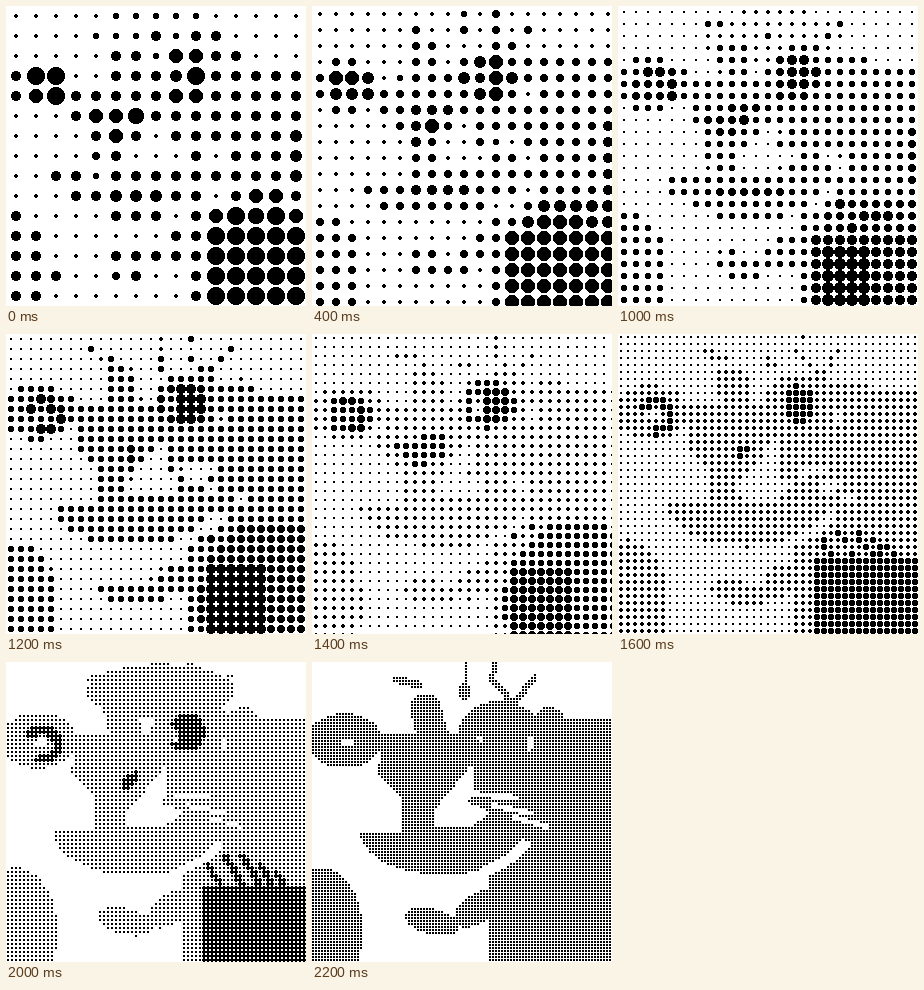
Animation, 300 px wide and 300 px high, one loop 2.4 s. Source, as an HTML page with a canvas:

```html
<!DOCTYPE html>
<html lang="en">
<head>
<meta charset="utf-8">
<title>Halftone cat</title>
<style>
html, body { margin: 0; width: 100%; height: 100%; overflow: hidden; background: #fff; }
canvas { display: block; width: 100vw; height: 100vh; image-rendering: pixelated; }
</style>
</head>
<body>
<canvas id="stage" width="300" height="300"></canvas>
<script>
const SIZE = 300, STEPS = 12, STEP_MS = 200;
const PAPER = 0.2, FUR = 0.54, COAT = 0.86;
const ctx = document.getElementById('stage').getContext('2d');

// Tone map: darkness is painted as grey and sampled once per halftone cell.
const toneCanvas = document.createElement('canvas');
toneCanvas.width = toneCanvas.height = SIZE;
const tc = toneCanvas.getContext('2d', { willReadFrequently: true });

function grey(d) {
  const v = Math.round(255 * (1 - d));
  return `rgb(${v},${v},${v})`;
}

function box(d, x, y, w, h) {
  tc.fillStyle = grey(d);
  tc.fillRect(x, y, w, h);
}

function oval(d, x, y, rx, ry = rx, turn = 0, end = 2 * Math.PI) {
  tc.beginPath();
  tc.ellipse(x, y, rx, ry, turn, 0, end);
  tc.fillStyle = grey(d);
  tc.fill();
}

function trace(pts) {
  tc.beginPath();
  for (let i = 0; i < pts.length; i += 2) tc.lineTo(pts[i], pts[i + 1]);
}

function patch(d, ...pts) {
  trace(pts);
  tc.fillStyle = grey(d);
  tc.fill();
}

function stroke(d, width, ...pts) {
  trace(pts);
  tc.strokeStyle = grey(d);
  tc.lineWidth = width;
  tc.stroke();
}

function paintHead() {
  box(FUR, 178, 56, 122, 244);
  oval(FUR, 188, 72, 42, 33);
  oval(FUR, 238, 60, 15);
  patch(FUR, 70, 73, 66, 112, 90, 136, 91, 176, 185, 176, 185, 70);
  oval(FUR, 128, 172, 80, 42, 0.03, Math.PI);
  oval(FUR, 165, 247, 26, 15, -0.6);
  oval(FUR, 120, 260, 28, 13, 0.25);
  oval(FUR, 10, 270, 42, 64);

  // forehead stripes
  stroke(FUR, 32, 114, 47, 122, 76);
  stroke(FUR, 9, 86, 18, 108, 24);
  stroke(FUR, 3, 154, 0, 154, 24);
  oval(FUR, 153, 30, 6, 9);
  stroke(FUR, 7, 200, 40, 180, 18, 184, 2);
  stroke(FUR, 7, 204, 40, 223, 16);
}

function paintEyes() {
  oval(FUR, 33, 79, 38, 28);
  oval(0.7, 38, 80, 24, 20);
  tc.beginPath();
  tc.arc(37, 83, 15, -2.4, 1.7);
  tc.strokeStyle = grey(0.9);
  tc.lineWidth = 9;
  tc.stroke();
  oval(PAPER, 36, 81, 7, 4, -0.2);

  oval(0.75, 178, 71, 26, 24);
  oval(0.9, 181, 71, 18, 19);
  oval(0.6, 167, 70, 4, 7);
  oval(PAPER, 169, 77, 3);
  stroke(PAPER, 5, 219, 77, 218, 87);
}

function paintMuzzle() {
  patch(0.66, 78, 107, 142, 99, 108, 142);
  oval(0.87, 125, 119, 11, 6, -0.7);
  oval(0.6, 130, 185, 34, 7);
  patch(PAPER, 160, 104, 163, 128, 155, 141, 178, 150, 160, 165, 122, 164, 122, 150);
  for (let k = 0; k < 3; k++) {
    const x = 160 + 22 * k, y = 132 + 12 * k, len = 46 - 7 * k;
    stroke(PAPER, 4, x, y, x + len, y + len * (0.1 + 0.1 * k));
  }
  stroke(PAPER, 9, 172, 211, 196, 199, 213, 183);
}

function paintCoat() {
  oval(0.6, 300, 150, 14, 38);
  oval(0.73, 265, 270, 73, 83);
  box(COAT, 198, 226, 102, 74);
  for (let i = 0; i < 5; i++) {
    const x = 203 + 17 * i, y = 204 - 10 * Math.sin(i);
    stroke(COAT, 6, x, y, x + 20, y + 32);
  }
  box(0.93, 202, 235, 56, 65);
}

tc.lineCap = tc.lineJoin = 'round';
box(PAPER, 0, 0, SIZE, SIZE);
oval(0.27, 155, 30, 75, 28);
paintHead();
paintEyes();
paintMuzzle();
paintCoat();
const tone = tc.getImageData(0, 0, SIZE, SIZE).data;

function darkness(x, y) {
  const px = Math.min(x, SIZE - 1), py = Math.min(y, SIZE - 1);
  return 1 - tone[(py * SIZE + px) * 4] / 255;
}

// Hard-edged disc of even width, built from pixel rows.
function dot(x, y, r) {
  for (let dy = -r; dy < r; dy++) {
    const w = Math.round(Math.sqrt(r * r - (dy + 0.5) ** 2));
    ctx.fillRect(x - w, y + dy, 2 * w, 1);
  }
}

function draw(step) {
  const pitch = Math.floor(20 - 17 * step / (STEPS - 1));
  const half = Math.floor(pitch / 2);
  ctx.fillStyle = '#fff';
  ctx.fillRect(0, 0, SIZE, SIZE);
  ctx.fillStyle = '#000';
  for (let y = half; y < SIZE + half; y += pitch)
    for (let x = half; x < SIZE + half; x += pitch)
      dot(x, y, Math.round(darkness(x, y) * half));
}

let shown = -1;
function tick(now) {
  const step = Math.floor(now / STEP_MS) % STEPS;
  if (step !== shown) draw(shown = step);
  requestAnimationFrame(tick);
}
draw(0);
requestAnimationFrame(tick);
</script>
</body>
</html>
```
